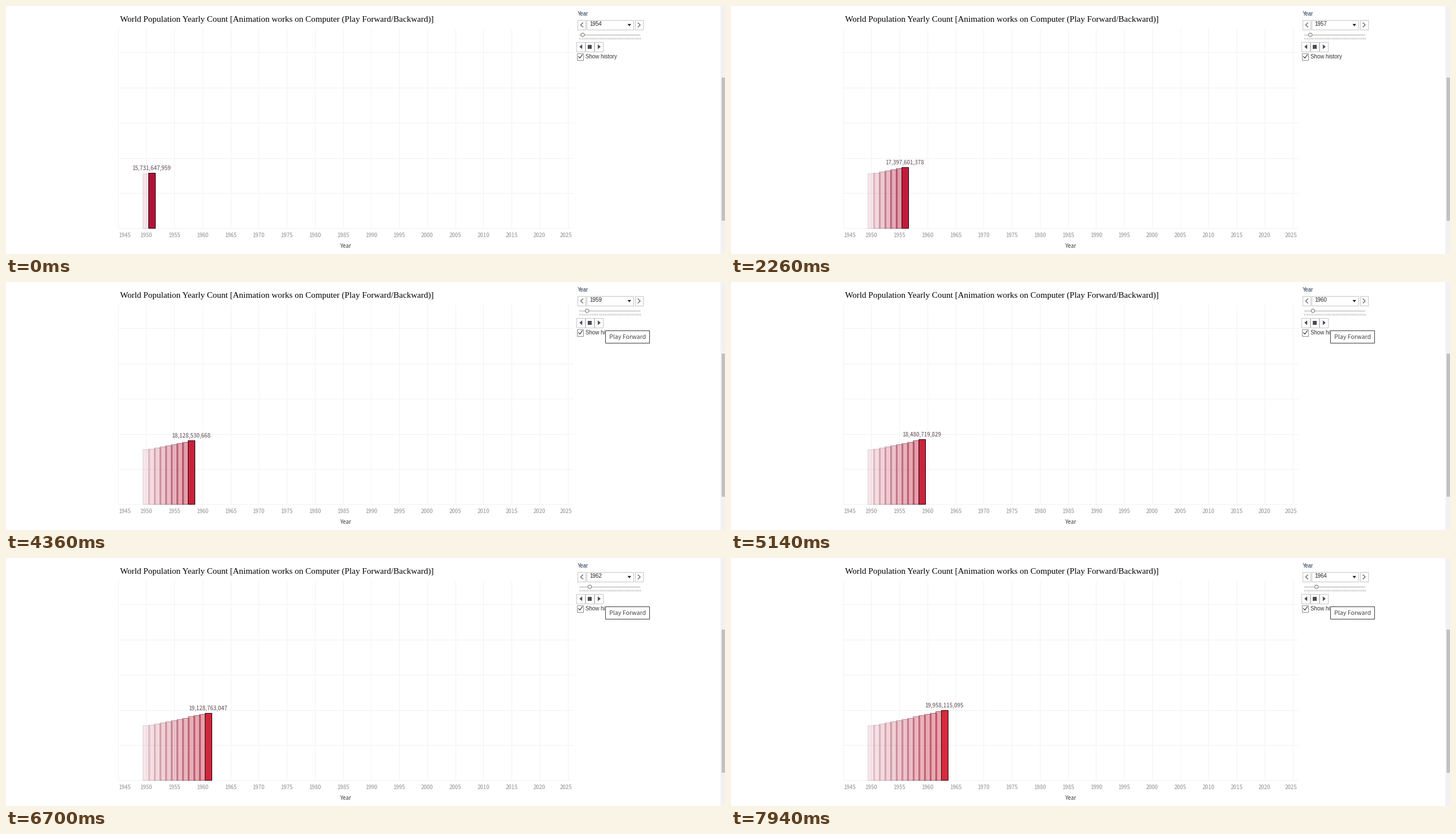
Write a matplotlib script that moves like this. It is 1273 by 440 pixels and loops after 8 s.

```python
import matplotlib.pyplot as plt
import numpy as np
from matplotlib.animation import FuncAnimation
from matplotlib.patches import Circle, Polygon, Rectangle

W, H, DPI = 1273, 440, 64
PT = 72 / DPI                     # points per pixel
LOOP, STEP = 8000, 40             # ms
UI, DATA, TITLE = "Liberation Sans", "Noto Sans CJK JP", "Liberation Serif"

FIRST, LAST = 1950, 1963
# Key yearly totals; the years between follow a straight line.
KEYS = {1950: 15546230518, 1951: 15731647959, 1954: 16685947167,
        1957: 17753428483, 1958: 18128530668, 1959: 18480719829,
        1961: 19128763047, 1963: 19958115095}
BASE_Y, PX_PER_BILLION, PX_PER_YEAR = 393.9, 6.24, 9.95
TIP_AT = 3600

fig = plt.figure(figsize=(W / DPI, H / DPI), dpi=DPI, facecolor="white")
ax = fig.add_axes([0, 0, 1, 1])
# The small offset keeps half-pixel lines from snapping to the next pixel.
ax.set_xlim(0.1, W + 0.1)
ax.set_ylim(H - 0.1, -0.1)
ax.axis("off")


def label(x, y, s, px, color, font=UI, ha="left", z=5):
    return ax.text(x, y, s, fontsize=px * PT, color=color, family=font,
                   ha=ha, va="baseline", zorder=z)


def box(x, y, w, h, edge="#c4c4c4", fill="white", z=3):
    return ax.add_patch(Rectangle((x, y), w, h, facecolor=fill,
                                  edgecolor=edge, linewidth=PT, zorder=z))


def shape(points, color):
    ax.add_patch(Polygon(points, facecolor=color, edgecolor="none", zorder=4))


def stroke(xs, ys, color, lw):
    ax.plot(xs, ys, color=color, lw=lw * PT, zorder=4)


def year_x(year):
    return 248.4 + PX_PER_YEAR * (year - FIRST)


def knob_x(year):
    return 1015 + 1.55 * (year - FIRST)


def total(year):
    return round(np.interp(year, list(KEYS), list(KEYS.values())))


def top_y(year):
    return round(BASE_Y - total(year) / 1e9 * PX_PER_BILLION - 0.5) + 0.5


def picked_year(t):
    return 1955 + (t - 220) // 850


def shown_year(t):
    """The bars start late, catch up in jumps, then advance steadily."""
    if t < 1410:
        return 1951
    if t < 2260:
        return 1954
    return 1956 + (t - 2260) // 811


def draw_chart():
    label(202, 27.7, "World Population Yearly Count [Animation works on "
          "Computer (Play Forward/Backward)]", 15.08, "black", TITLE)
    grid = "#f1f1f1"
    for year in range(1945, 2030, 5):
        x = year_x(year)
        ax.vlines(round(x) + 0.5, 40, 394, color=grid, lw=PT, zorder=1)
        label(np.clip(x, 210.2, 992), 410, str(year), 9.7, "#919191",
              DATA, "center")
    for i in range(6):
        y = int(BASE_Y - 10 * PX_PER_BILLION * i) + 0.5
        ax.hlines(y, 198, 1004, color=grid, lw=PT, zorder=1)
    label(601, 428.4, "Year", 9.8, "#3c3c3c", DATA, "center")
    ax.hlines(439.5, 196, 1133, color="#ececec", lw=PT, zorder=1)


def draw_panel():
    ink = "#4b4b57"
    label(1012, 17.3, "Year", 9.5, "#22344e")
    box(1028.5, 24.5, 83, 17)
    shape([(1100.5, 31.8), (1107, 31.8), (1103.7, 35.8)], "#222222")
    for x, d in ((1019.5, 1), (1121, -1)):
        box(x - 7, 24.5, 14, 17)
        stroke([x + 2 * d, x - 2 * d, x + 2 * d], [29.8, 33.5, 37.2],
               "#444444", 1.1)

    box(1015, 50, 108.5, 2.5, "none", "#dcdcdc")
    ax.vlines([knob_x(y) for y in range(1950, 2021)], 56, 59,
              color="#bdbdbd", lw=0.7 * PT, zorder=3)

    for i in range(3):
        box(1010.5 + 16 * i, 63.5, 15, 17)
    for x, d in ((1017.8, -1), (1050.4, 1)):
        shape([(x - 2.5 * d, 68), (x - 2.5 * d, 76.4), (x + 2.5 * d, 72.2)],
              ink)
    box(1030.5, 69, 6.5, 6.6, "none", ink, z=4)

    box(1011.5, 83.5, 11, 12, "#8c8c8c")
    stroke([1013.8, 1016.2, 1020.4], [89.6, 92.4, 86.4], "#333333", 1.2)
    label(1026, 92.4, "Show history", 9.8, "#333333")


def draw_scrollbar():
    box(1265, 0, 8, H, "none", "#f1f1f1")
    box(1267, 127, 6, 254, "none", "#c1c1c1", z=4)


def make_bar(year):
    top = top_y(year)
    return box(round(year_x(year) - 6) + 0.5, top, 12, 393.5 - top,
               z=2 + (year - FIRST) / 100)


draw_chart()
draw_panel()
draw_scrollbar()
bars = {year: make_bar(year) for year in range(FIRST, LAST + 1)}
count = label(0, 0, "", 9.85, "#5f4a54", DATA, "center")
picked = label(1033, 35.3, "", 9.8, "#222222")
knob = ax.add_patch(Circle((0, 51), 3.1, facecolor="white",
                           edgecolor="#6e6e6e", linewidth=PT, zorder=5))
tip = [box(1061.5, 85.5, 78, 22, "#3a3a3a", z=8),
       label(1068, 100.9, "Play Forward", 10.6, "#444444", DATA, z=9)]


def bar_color(year):
    k = (year - FIRST) / (LAST - FIRST)
    return (0.685 + 0.155 * k, 0.06 + 0.11 * k, 0.22 + 0.02 * k)


def update(n):
    t = n * STEP + STEP - 1
    last = shown_year(t)
    for year, bar in bars.items():
        bar.set_visible(year <= last)
        if year < last:
            age = (year - FIRST) / max(last - 1 - FIRST, 1)
            bar.set_facecolor((*bar_color(year), 0.10 + 0.33 * age))
            bar.set_edgecolor((0.28, 0.02, 0.1, 0.14 + 0.42 * age))
        else:
            bar.set_facecolor(bar_color(year))
            bar.set_edgecolor("#1c0508")
    count.set_text(f"{total(last):,}")
    count.set_position((year_x(last) - 0.5, top_y(last) - 4.6))

    year = picked_year(t)
    picked.set_text(str(year))
    knob.set_center((knob_x(year), 51))
    for part in tip:
        part.set_visible(t >= TIP_AT)
    return [*bars.values(), count, picked, knob, *tip]


anim = FuncAnimation(fig, update, frames=LOOP // STEP, interval=STEP,
                     repeat=True, repeat_delay=0, blit=False)
plt.show()
```
